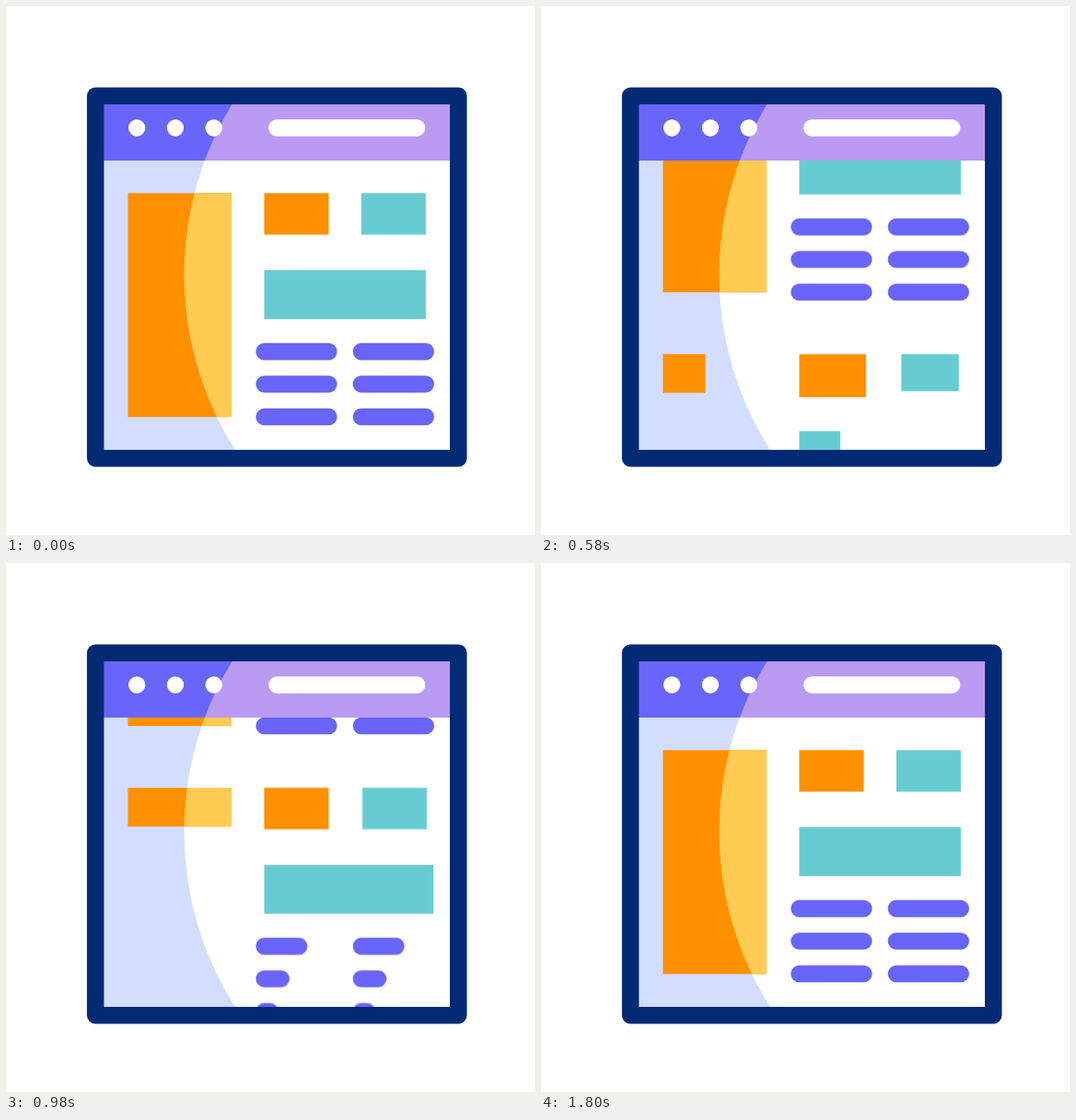
Animation, 640 px wide and 640 px high, one loop 2020 ms. Source, as an HTML page:

```html
<!DOCTYPE html>
<html lang="en">
<head>
<meta charset="utf-8">
<title>Scrolling page</title>
<style>
  html, body { margin: 0; width: 100%; height: 100%; overflow: hidden; background: #fff; }
  svg { display: block; width: 100vw; height: 100vh; }

  .scroll, .grow rect {
    animation: 2020ms cubic-bezier(.3333, 0, .6667, 1) infinite both;
  }
  .scroll { animation-name: scroll; }

  .side { x: 147.5px; y: 226.4px; width: 125.5px; height: 270.8px; fill: #ff9000; }
  .lit .side { fill: #ffcb52; }
  .card { x: 312.4px; y: 226.4px; width: 78px; height: 50.2px; fill: #ff9000; }
  .tile { x: 429.9px; y: 226.4px; width: 78px; height: 50.2px; fill: #67ccd2; }
  .wide { x: 312.4px; y: 319.5px; width: 195.5px; height: 59.3px; fill: #67ccd2; }
  .bar { width: 98.4px; height: 20.6px; rx: 10.3px; fill: #6865f8; }

  .grow .side { animation-name: side-width, side-height; }
  .grow .card { animation-name: card; transform-box: fill-box; transform-origin: 0 0; }
  .grow .tile { animation-name: tile, tile-shift; transform-box: fill-box; transform-origin: 0 0; }
  .grow .wide { animation-name: wide; }
  .grow .bar { animation-name: bar; }
  .grow .row2 { animation-delay: 100ms; }
  .grow .row3 { animation-delay: 200ms; }
  .row1 { y: 407.8px; }
  .row2 { y: 447.2px; }
  .row3 { y: 486.7px; }
  .left { x: 302.2px; }
  .right { x: 419.6px; }

  @keyframes scroll {
    0% { transform: translateY(0); }
    62.87%, 100% { transform: translateY(-345.6px); }
  }
  @keyframes side-width {
    0%, 22.97% { width: 10.5px; }
    38.42% { width: 139.7px; }
    47.33%, 100% { width: 125.5px; }
  }
  @keyframes side-height {
    0%, 52.87% { height: 46.8px; }
    68.32% { height: 302px; }
    77.23%, 100% { height: 270.8px; }
  }
  @keyframes card {
    0%, 11.63% { transform: scale(.39); }
    24.55% { transform: scale(1.06); }
    34.46%, 100% { transform: scale(1); }
  }
  @keyframes tile {
    0%, 12.87% { transform: scale(.39); }
    36.44% { transform: scale(1.06); }
    46.34%, 100% { transform: scale(1); }
  }
  @keyframes tile-shift {
    0%, 12.87% { x: 429.9px; }
    31.68% { x: 436.3px; }
    55.45%, 100% { x: 429.9px; }
  }
  @keyframes wide {
    0%, 21.68% { width: 0; }
    44.16% { width: 211.5px; }
    54.06%, 100% { width: 195.5px; }
  }
  @keyframes bar {
    0%, 36.39% { width: 25.5px; }
    63.37% { width: 112px; }
    79.7%, 100% { width: 98.4px; }
  }
</style>
</head>
<body>
<svg viewBox="0 0 640 640">
  <defs>
    <clipPath id="view"><rect x="118" y="187" width="420" height="351"/></clipPath>
    <clipPath id="window"><rect x="118" y="119" width="420" height="419"/></clipPath>
    <clipPath id="glow"><circle cx="610.5" cy="325" r="395"/></clipPath>
  </defs>

  <g clip-path="url(#window)">
    <rect x="118" y="119" width="420" height="419" fill="#d3ddfe"/>
    <circle cx="610.5" cy="325" r="395" fill="#fff"/>
    <rect x="118" y="119" width="420" height="68" fill="#6865f8"/>
    <rect x="118" y="119" width="420" height="68" fill="#bb9af3" clip-path="url(#glow)"/>
  </g>

  <g fill="#fff">
    <circle cx="158.3" cy="147.5" r="10.2"/>
    <circle cx="204.9" cy="147.5" r="10.2"/>
    <circle cx="251.4" cy="147.5" r="10.2"/>
    <rect x="317.5" y="137.2" width="189.8" height="20.5" rx="10.25"/>
  </g>

  <g clip-path="url(#view)">
    <g class="scroll">
      <rect class="side"/>
      <g class="grow" transform="translate(0 345.6)"><rect class="side"/></g>
    </g>
    <g class="lit" clip-path="url(#glow)">
      <g class="scroll">
        <rect class="side"/>
        <g class="grow" transform="translate(0 345.6)"><rect class="side"/></g>
      </g>
    </g>
    <g class="scroll">
      <g>
        <rect class="card"/>
        <rect class="tile"/>
        <rect class="wide"/>
        <rect class="bar row1 left"/><rect class="bar row1 right"/>
        <rect class="bar row2 left"/><rect class="bar row2 right"/>
        <rect class="bar row3 left"/><rect class="bar row3 right"/>
      </g>
      <g class="grow" transform="translate(0 345.6)">
        <rect class="card"/>
        <rect class="tile"/>
        <rect class="wide"/>
        <rect class="bar row1 left"/><rect class="bar row1 right"/>
        <rect class="bar row2 left"/><rect class="bar row2 right"/>
        <rect class="bar row3 left"/><rect class="bar row3 right"/>
      </g>
    </g>
  </g>

  <rect x="108.2" y="108.8" width="439.1" height="438.5" fill="none"
        stroke="#032b75" stroke-width="20.6" stroke-linejoin="round"/>
</svg>
</body>
</html>
```
